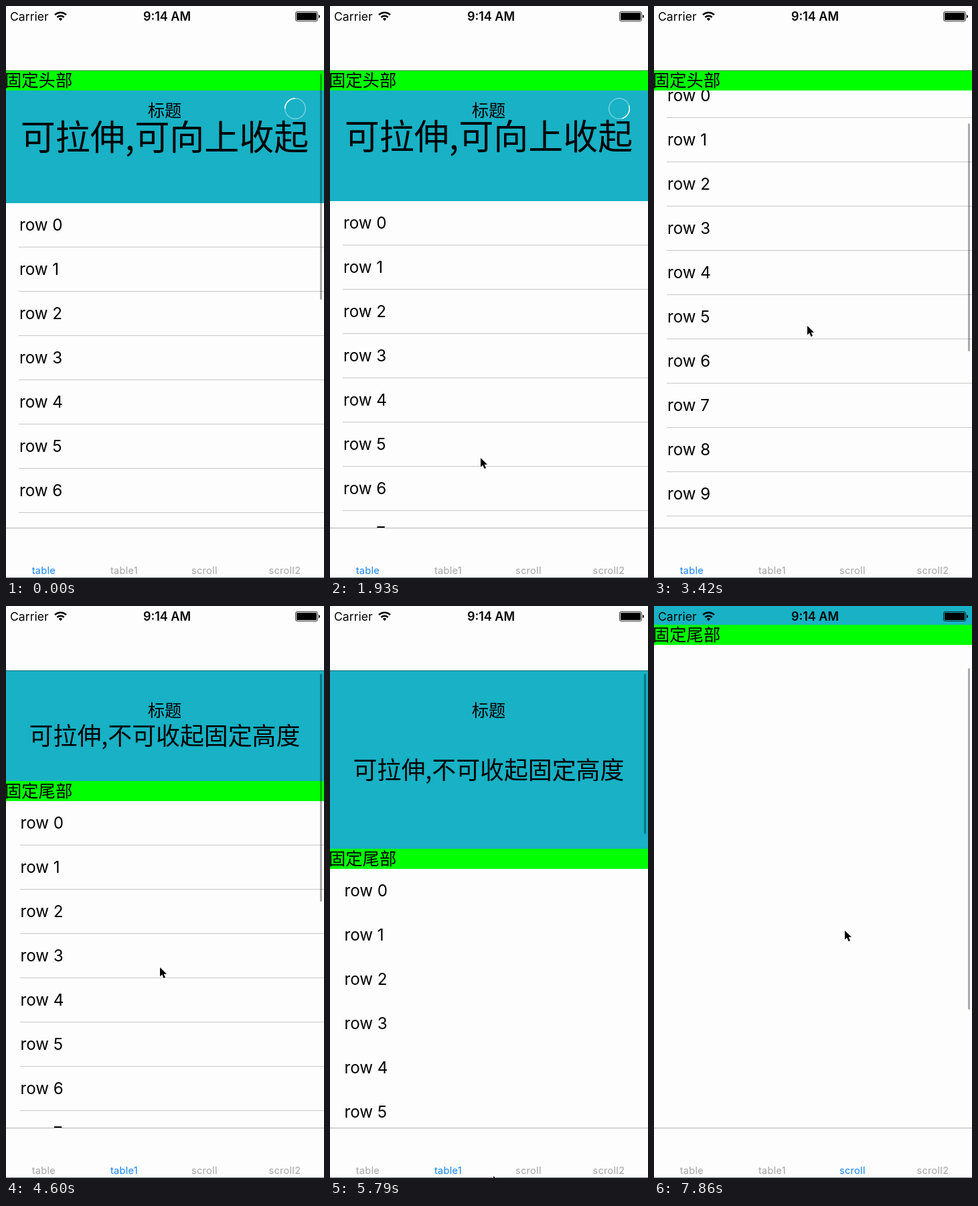
These frames come from a looping animation (475 px wide and 853 px high, 8000 ms). An HTML page:

```html
<!DOCTYPE html>
<html lang="zh-CN">
<head>
<meta charset="utf-8">
<title>Stretchy headers</title>
<style>
  html, body { margin: 0; width: 100%; height: 100%; overflow: hidden; background: #fdfdfd; }
  #stage { display: block; width: 100%; height: 100%; }
  text { font-family: Inter, "Noto Sans CJK SC", "Noto Sans CJK", sans-serif; white-space: pre; }
  .zh { font-family: "Noto Sans CJK SC", "Noto Sans CJK", sans-serif; font-size: 25.3px; }
  .mid { text-anchor: middle; }
  .row { font-size: 24.2px; }
  .tab { font-size: 14.5px; letter-spacing: .3px; text-anchor: middle; fill: #a3a3a3; }
  .tab.on { fill: #1284fa; }
</style>
</head>
<body>
<svg id="stage" viewBox="0 0 475 853" xmlns="http://www.w3.org/2000/svg">
  <rect width="475" height="853" fill="#fdfdfd"/>
  <g id="rows"></g>

  <svg id="head" width="475" height="165" overflow="hidden">
    <rect width="475" height="500" fill="#18b1c5"/>
    <text id="title" class="zh mid" x="237">标题</text>
    <text id="big" class="zh mid" x="237"></text>
    <g id="spinner" fill="none" stroke="#fff" stroke-width="1.5">
      <circle r="15.3" stroke-opacity=".4"/>
      <path id="arc" d="M-15.3 0A15.3 15.3 0 0 1 0 -15.3"/>
    </g>
  </svg>

  <g id="strip">
    <rect width="475" height="30" fill="#0f0"/>
    <text id="stripText" class="zh" x="-2" y="24.4"></text>
  </g>

  <rect id="top" width="475"/>
  <rect id="topLine" y="96" width="475" height="1" fill-opacity=".4"/>

  <text x="6" y="22" font-size="17.6">Carrier</text>
  <g fill="none" stroke="#000" stroke-width="2.5">
    <path d="M73 13.2a12.2 12.2 0 0 1 17 0"/>
    <path d="M76.4 16.8a7.3 7.3 0 0 1 10.2 0"/>
  </g>
  <path d="M78.8 19.2a3.8 3.8 0 0 1 5.4 0l-2.7 3z"/>
  <text class="mid" x="240.5" y="22" font-size="18" font-weight="600">9:14 AM</text>
  <rect x="432.5" y="8.5" width="33" height="14" rx="2.5" fill="none" stroke="#000" stroke-width=".8"/>
  <rect x="434" y="10" width="30" height="11" rx="1"/>
  <path d="M467 13q2 .5 2 2.5t-2 2.5z"/>

  <rect id="bar" x="469" width="3" rx="1.5"/>

  <rect y="779" width="475" height="74" fill="#fdfdfd"/>
  <rect y="778" width="475" height="1" fill="#b2b2b2"/>
  <rect y="852" width="475" height="1" fill="#7d858c"/>
  <g id="tabs"></g>

  <path id="cursor" d="M0 0V13.5L3.2 10.6L5.5 16L8 15L5.7 9.8H10Z" stroke="#fff" stroke-width="1.4" paint-order="stroke"/>
</svg>

<script>
const LOOP = 8000, STEPS = 54, LEAD = 8;
const HEAD = 165, ROW = 66, STATUS = 28, VIEW = 683;
const TAP1 = 28, TAP2 = 47;                    // steps at which the tab changes
const DRAG = { from: 14, to: 23 }, PULL = { from: 31, to: 38 }, SWIPE = { from: 48, to: 53 };
const NS = 'http://www.w3.org/2000/svg';

const $ = id => document.getElementById(id);
const put = (el, attrs) => { for (const k in attrs) el.setAttribute(k, attrs[k]); };
const move = (el, x, y) => put(el, { transform: `translate(${x} ${y})` });
const show = (el, on) => { el.style.display = on ? '' : 'none'; };
const clamp = (v, lo, hi) => Math.min(hi, Math.max(lo, v));
const easeOut = u => 1 - (1 - u) ** 2;
const settle = x => (1 + x) * Math.exp(-x);    // critically damped return, 1 to 0
const rubber = d => VIEW * (1 - 1 / (d * .55 / VIEW + 1));

function add(parent, tag, attrs, label = '') {
  const el = document.createElementNS(NS, tag);
  put(el, attrs);
  el.textContent = label;
  return parent.appendChild(el);
}

const pages = [
  { top: 126, title: 39.4, text: '可拉伸,可向上收起', size: 52, base: 87.8, strip: '固定头部', x: 20, line: 19 },
  { top: 96, title: 69.4, text: '可拉伸,不可收起固定高度', size: 35.9, base: 111.2, strip: '固定尾部', x: 21.5, line: 21 },
  { top: 0, title: 69.4, text: '可拉伸,可向上收起', size: 35.9, base: 111.2, strip: '固定尾部' }
];

// Pointer stops: step, x, y
const stops = [
  [3, 218, 870], [7, 200, 822], [9, 198, 822], [DRAG.from, 226, 668], [DRAG.to, 229, 477],
  [24, 229, 477], [27, 177, 826], [29, 177, 826], [PULL.from, 230, 539], [PULL.to, 244, 850],
  [39, 244, 850], [46, 292, 808], [SWIPE.from, 287, 637], [SWIPE.to, 285, 484]
];

function pointer(step) {
  const i = stops.findIndex(p => p[0] >= step);
  const b = stops[i], a = stops[Math.max(0, i - 1)];
  const u = easeOut(clamp((step - a[0]) / (b[0] - a[0] || 1), 0, 1));
  return { x: a[1] + (b[1] - a[1]) * u, y: a[2] + (b[2] - a[2]) * u };
}

// How far the finger has gone down during a drag, held outside it
const dragged = (d, step) =>
  pointer(clamp(step, d.from, d.to)).y - pointer(d.from).y;

// Scroll offset of each page, negative when pulled down
const offsets = [
  s => -dragged(DRAG, s) - 3 * settle(s),
  s => -rubber(dragged(PULL, s)) * settle(.99 * Math.max(0, s - PULL.to)),
  s => -dragged(SWIPE, s)
];

// Steps between which the scroll bar stays before it fades
const barTimes = [[0, 2], [15, 25], [31, 42], [49, STEPS]];
const barAlpha = s => .33 * Math.max(...barTimes.map(([from, to]) =>
  s < from ? 0 : clamp(1 - (s - to) / 2, 0, 1)));

const labels = [], lines = [];
for (let i = 0; i < 14; i++) {
  labels.push(add($('rows'), 'text', { class: 'row', y: i * ROW + 41.3 }, 'row ' + i));
  lines.push(add($('rows'), 'rect', { y: i * ROW + 65, width: 475, height: 1, fill: '#c8c7cc' }));
}
const tabs = ['table', 'table1', 'scroll', 'scroll2'].map((name, i) =>
  add($('tabs'), 'text', { class: 'tab', x: 56.4 + i * 120, y: 847 }, name));

function showPage(n) {
  const p = pages[n], table = n < 2;
  $('big').textContent = p.text;
  $('big').style.fontSize = p.size + 'px';
  $('stripText').textContent = p.strip;
  put($('head'), { y: p.top });
  put($('top'), table ? { height: 96, fill: '#fdfdfd' } : { height: STATUS, fill: '#18b1c5' });
  show($('topLine'), table);
  show($('rows'), table);
  show($('spinner'), n === 0);
  tabs.forEach((tab, i) => tab.classList.toggle('on', i === n));
  if (!table) return;
  labels.forEach(el => put(el, { x: p.x }));
  lines.forEach(el => put(el, { x: p.line }));
}

function draw(step) {
  const n = step < TAP1 ? 0 : step < TAP2 ? 1 : 2;
  const p = pages[n], table = n < 2;
  const off = Math.trunc(offsets[n](step));
  const up = Math.max(off, 0);
  const height = Math.max(table ? 0 : STATUS, HEAD - off);
  if (n !== shown) showPage(shown = n);

  put($('head'), { height });
  put($('title'), { y: p.title - up });
  put($('big'), { y: p.base - (table ? off / 2 : off) });
  move($('strip'), 0, n === 0 ? 96 : p.top + height);
  move($('rows'), 0, 291 - off);
  move($('spinner'), 432, 27 - up);
  put($('arc'), { transform: `rotate(${step * 68})` });

  // separators drop out while the table springs back
  const springing = n === 1 && step > PULL.to && off < -4;
  lines.forEach(el => show(el, !springing));

  put($('bar'), table
    ? { y: Math.round(101 + .39 * up), height: 340 + Math.min(off, 0) }
    : { y: 1 + .6 * off, height: 509 });
  put($('bar'), { 'fill-opacity': barAlpha(step) });

  const at = pointer(step);
  move($('cursor'), Math.round(at.x), Math.round(at.y));
}

let shown = -1, last = -1;
const start = performance.now();
function tick(now) {
  const t = Math.max(0, now - start) % LOOP;
  const step = Math.min(STEPS - 1, Math.floor((t + LEAD) * STEPS / LOOP));
  if (step !== last) draw(last = step);
  requestAnimationFrame(tick);
}
tick(start);
</script>
</body>
</html>
```
